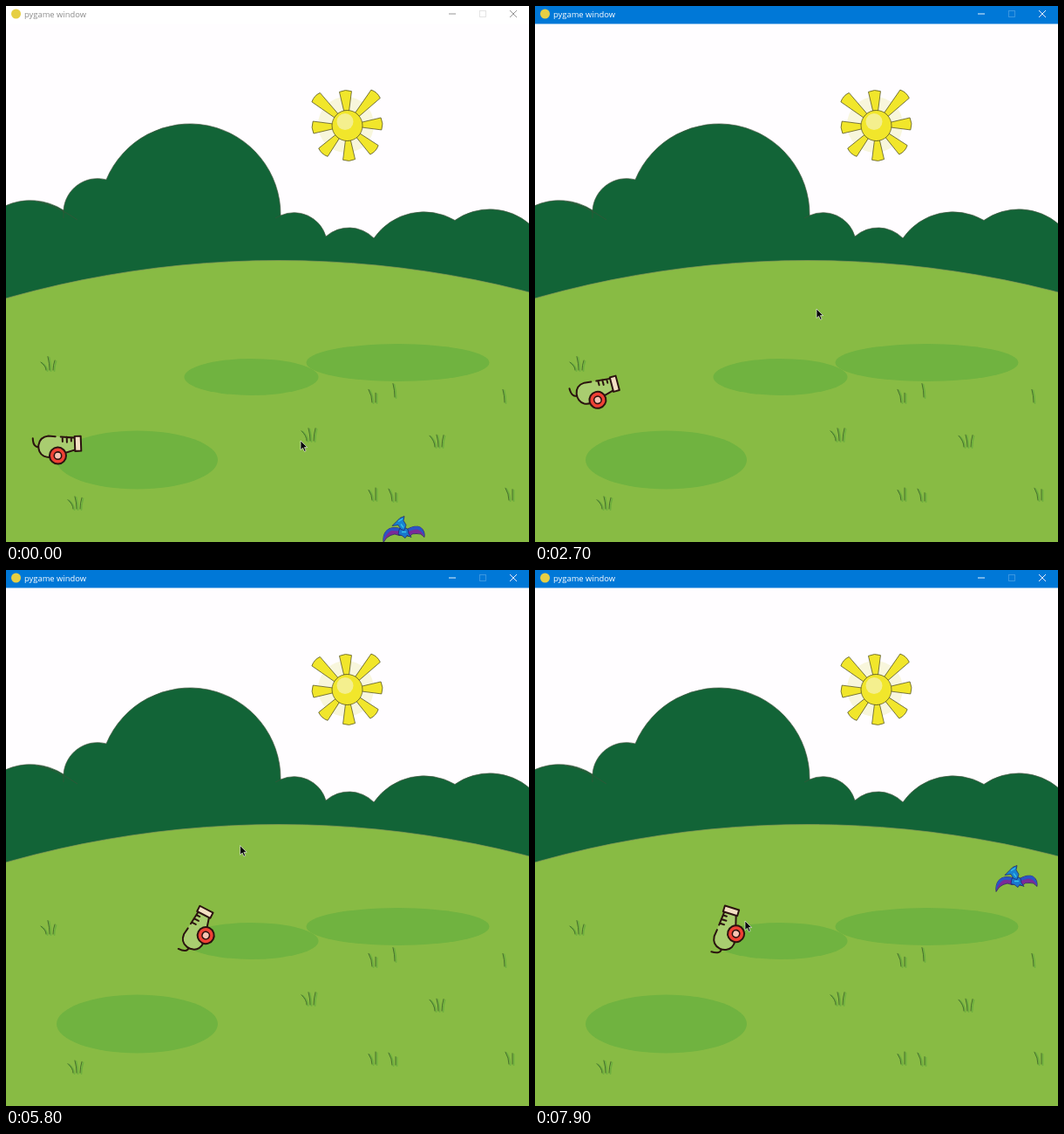
Animation, 600 px wide and 614 px high, one loop 8 s. Source, as an HTML page:

```html
<!DOCTYPE html>
<html lang="en">
<head>
<meta charset="utf-8">
<title>pygame window</title>
<style>
  html, body { margin: 0; width: 100%; height: 100%; overflow: hidden; background: #fffdff; }
  svg { display: block; width: 600px; height: 614px; }
  #bar { fill: #fff; color: #8c8c8c; }
  #bar text { font: 9.4px "Open Sans", "Noto Sans", sans-serif; fill: currentColor; }
  #bar .sign { fill: none; stroke: currentColor; stroke-width: .9; }
  #bar .off { opacity: .25; }
  #bar.active { fill: #0078d7; color: #fff; }
  #sun { stroke: #4a4820; stroke-width: .7; fill: #f1e62b; }
  .patch { fill: #70b340; }
  #grass path { fill: none; stroke-linecap: round; }
  #cannon { stroke: #2b130f; stroke-width: 2; stroke-linejoin: round; stroke-linecap: round; }
</style>
</head>
<body>
<svg viewBox="0 0 600 614">
  <rect width="600" height="614" fill="#fffdff"/>

  <circle cx="390" cy="136" r="32" fill="#f8f6dc"/>
  <g id="sun">
    <g id="rays" transform="translate(391.500 137)"></g>
    <circle cx="391.500" cy="137" r="17.500"/>
    <circle cx="389" cy="132.500" r="9.500" fill="#f4ef8e" stroke="none"/>
  </g>

  <path fill="#126437" stroke="#4a5a45" stroke-width=".7" d="M-1 229A70 70 0 0 1 66 234A39 39 0 0 1 115 199
    A104 104 0 0 1 315 240A38 38 0 0 1 367 264A40 40 0 0 1 422 266A70 70 0 0 1 515 245.500A70 70 0 0 1 601 250V345H-1Z"/>
  <path d="M36 224Q57 228 82 245M66 234V243M315 240L309 243" fill="none" stroke="#3d5238" stroke-width=".6"/>

  <circle cx="313" cy="1441.500" r="1150" fill="#88bb44" stroke="#8a9a58" stroke-width=".7"/>
  <ellipse class="patch" cx="281.500" cy="425" rx="77" ry="21"/>
  <ellipse class="patch" cx="449.500" cy="408.500" rx="105" ry="21.500"/>
  <ellipse class="patch" cx="150.500" cy="520" rx="92.500" ry="33.500"/>
  <g id="grass"></g>

  <g id="bar">
    <rect width="600" height="20.500"/>
    <circle cx="11.500" cy="9" r="5.500" fill="#e6cf43"/>
    <text x="21" y="13">pygame window</text>
    <path class="sign" d="M508 9H516M578 5L586 13M586 5L578 13"/>
    <rect class="sign off" x="543.500" y="5.500" width="7" height="7"/>
  </g>

  <g id="cannon">
    <path d="M-24 2C-28 3 -31 0 -31 -8" fill="none"/>
    <path d="M-13 -10L17 -7V7L-5 13Q-12 16 -19 13C-28 8 -27 -9 -13 -10Z" fill="#a9cd70" stroke="none"/>
    <path d="M-5 -9L-13 -10C-27 -9 -28 8 -19 13Q-12 16 -5 13L17 7M1 -8.500L17 -7M3 -8V-3M8 -8V-2M13 -7V-3" fill="none"/>
    <rect x="17" y="-8.500" width="7" height="17" fill="#f3dfc3"/>
    <circle cx="-3" cy="13" r="9.500" fill="#f04135"/>
    <circle cx="-3" cy="13" r="4.200" fill="#f7c4b4" stroke-width="1.600"/>
  </g>

  <g id="bullet">
    <ellipse rx="7" ry="4.500" fill="#15131b"/>
    <circle cx="2" cy="-1" r="2" fill="#eee4e8"/>
    <path d="M-5 1L-1 2" stroke="#777985"/>
  </g>

  <g id="bird" stroke="#221c66" stroke-width=".7" stroke-linejoin="round">
    <path d="M23 15Q10 10 4 17Q0 22 1 30Q4 24 9 22Q14 19 19 22L25 21ZM26 16Q38 9 44 13Q49 17 48 24Q44 19 39 20Q34 19 31 23L25 22Z" fill="#7a2a98"/>
    <path d="M23 15Q10 10 4 17Q0 22 1 29Q4 19 10 16.500Q17 16 23 18ZM27 16Q38 9 44 13Q48 17 48 23Q44 15 38 15Q32 16 27 19Z" fill="#2a55c4" stroke="none"/>
    <path d="M19 15Q25 11 29 15L30 20L33 24L28 22L26 25L22 22L18 21Z" fill="#1976cc"/>
    <path d="M11 11L16 6L20 2L25 0L24 5L27 10L25 16L21 15L18 10Z" fill="#1783d2"/>
    <path d="M18 6L23 3M21 9L24 13M22 18L27 18" stroke="#39c1e9" stroke-width="1.300"/>
  </g>

  <path id="cursor" d="M0 0V10.500L2.500 8.300L4.300 12.300L6.100 11.500L4.300 7.600H7.600Z" fill="#080808" stroke="#fff" stroke-width=".6"/>
</svg>

<script>
const LOOP = 8000, STEP = 100, AIM_LAG = 100, DEG = 180 / Math.PI;
const el = id => document.getElementById(id);

function addPath(parent, attrs) {
  const node = document.createElementNS("http://www.w3.org/2000/svg", "path");
  for (const key in attrs) node.setAttribute(key, attrs[key]);
  el(parent).append(node);
}

// Straight rays are short; slanted ones grow towards the top.
for (let i = 0; i < 8; i++) {
  const angle = i * 45 - 93;
  const r = i % 2 ? 46 - 5 * Math.sin(angle / DEG) : 40;
  addPath("rays", {
    d: `M17 -3L${r - 1} -7Q${r + 2} 0 ${r - 1} 7L17 3Z`,
    transform: `rotate(${angle})`
  });
}

let seed = 7;
const random = () => (seed = seed * 16807 % 2147483647) / 2147483647;

// Blades fan out from the root of their tuft.
function tuft(x, y, blades) {
  for (let i = 0; i < blades; i++) {
    const side = i - (blades - 1) / 2;
    const root = x + side * 4, tip = x + side * 8 - 2;
    const top = y - 9 - random() * 7;
    const d = `M${tip} ${top}Q${root} ${(top + y) / 2} ${root} ${y}`;
    addPath("grass", { d, stroke: "#6fb03f", "stroke-width": 1.8, transform: "translate(1.5 1)" });
    addPath("grass", { d, stroke: "#355c28", "stroke-width": .8 });
  }
}
tuft(50, 417, 3);
tuft(81, 576, 3);
tuft(349, 498, 3);
tuft(496, 505, 3);
tuft(422, 454, 2);
tuft(422, 566, 2);
tuft(445, 567, 2);
tuft(579, 566, 2);
tuft(446, 448, 1);
tuft(572, 454, 1);

// Way points: time, x, y.
const cursorPath = [
  [0, 338, 498], [1000, 322, 604], [1900, 409, 568], [2700, 323, 347], [3800, 335, 297],
  [4900, 357, 177], [6600, 190, 439], [6700, 182, 412], [7300, 247, 490], [7800, 233, 370], [7900, 241, 402]
];
const cannonPath = [[0, 62, 502], [1900, 62, 502], [2700, 71.5, 438], [3800, 203.5, 430.5], [4900, 219, 410]];

// Each bird enters at the right edge and flies left until it is hit.
const birds = [
  { start: -1647, end: 1800, y: 584.5, speed: 102 },
  { start: 3272, end: 5300, y: 162, speed: 125 },
  { start: 7324, end: LOOP, y: 338.5, speed: 125 }
];
const shot = { start: 4200, end: 5300, x: 228, y: 408.5, angle: -59.4, speed: 250 };

const lasts = (flight, t) => t >= flight.start && t < flight.end;

function pointAt(path, t) {
  const next = path.findIndex(point => point[0] > t);
  if (next < 0) return path.at(-1).slice(1);
  const [t0, x0, y0] = path[Math.max(next - 1, 0)], [t1, x1, y1] = path[next];
  const k = t1 > t0 ? (t - t0) / (t1 - t0) : 0;
  return [x0 + (x1 - x0) * k, y0 + (y1 - y0) * k];
}

function place(id, x, y, angle = 0) {
  el(id).setAttribute("transform", `translate(${x} ${y}) rotate(${angle})`);
}

function drawCannon(t) {
  const [x, y] = pointAt(cannonPath, t);
  const [aimX, aimY] = pointAt(cursorPath, Math.max(t - AIM_LAG, 0));
  place("cannon", x, y, Math.atan2(aimY - y - 6, aimX - x) * DEG);
}

function drawBird(t) {
  const bird = birds.find(b => lasts(b, t));
  el("bird").style.display = bird ? "" : "none";
  if (bird) place("bird", 600 - bird.speed * (t - bird.start) / 1000, bird.y);
}

function drawShot(t) {
  const { start, x, y, angle, speed } = shot;
  const way = speed * (t - start) / 1000;
  el("bullet").style.display = lasts(shot, t) ? "" : "none";
  place("bullet", x + way * Math.cos(angle / DEG), y + way * Math.sin(angle / DEG), angle);
}

function draw(now) {
  const t = Math.floor(now % LOOP / STEP) * STEP;
  el("bar").classList.toggle("active", t >= 1200);
  place("cursor", ...pointAt(cursorPath, t));
  drawCannon(t);
  drawBird(t);
  drawShot(t);
}

let begin;
function tick(now) {
  begin ??= now;
  draw(now - begin);
  requestAnimationFrame(tick);
}
draw(0);
requestAnimationFrame(tick);
</script>
</body>
</html>
```
